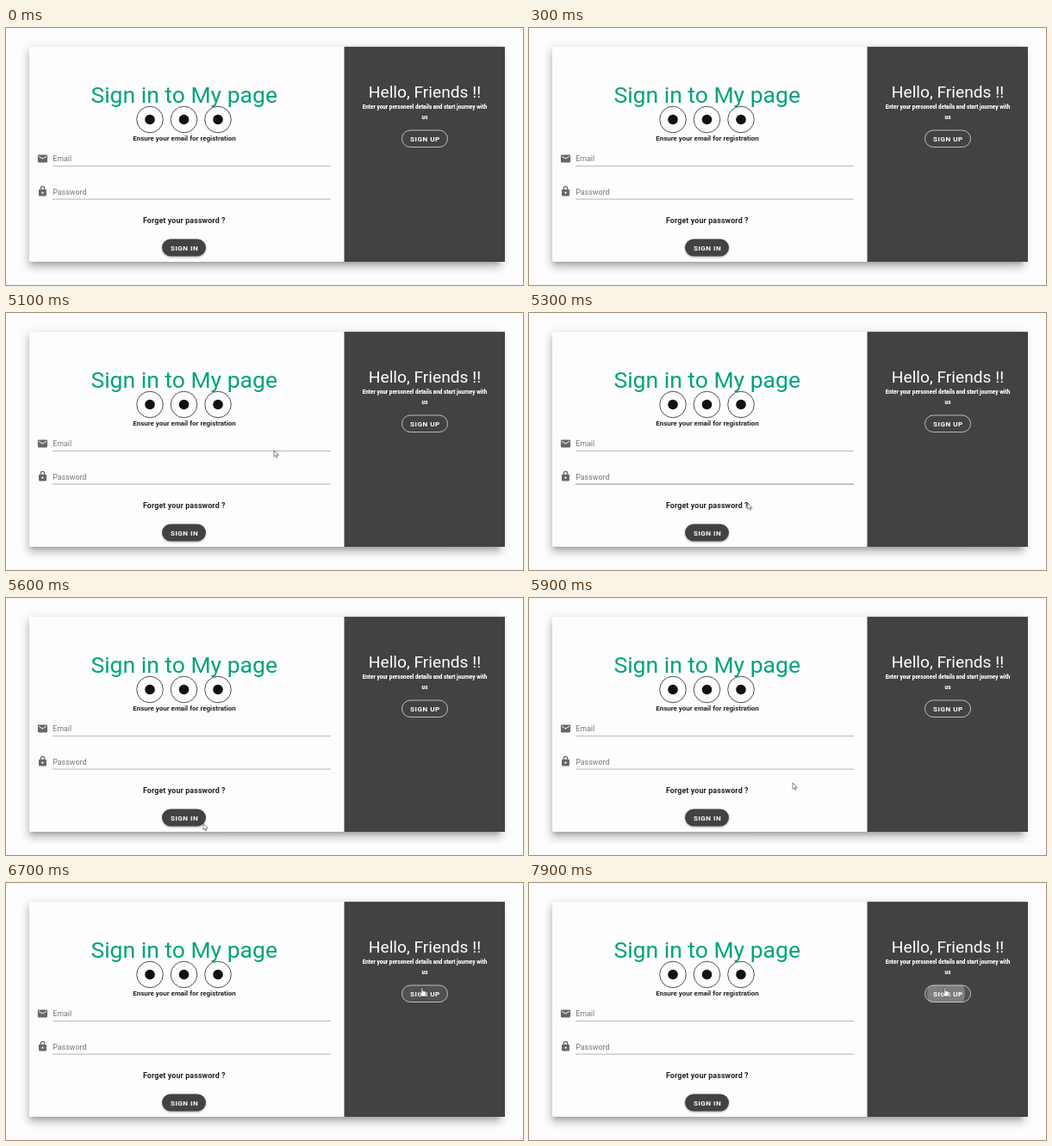
Animation, 600 px wide and 299 px high, one loop 8000 ms. Source, as an HTML page:

```html
<!DOCTYPE html>
<html lang="en">
<head>
<meta charset="utf-8">
<title>Sign in</title>
<style>
html, body { margin: 0; width: 100%; height: 100%; overflow: hidden; background: #fdfcfe; }
svg { position: absolute; inset: 0; display: block; width: 100%; height: 100%; }
text { font-family: Roboto, sans-serif; }
.mid { text-anchor: middle; }
.field { font-size: 8.9px; fill: #777; }
.btn { font-size: 8.1px; font-weight: 700; letter-spacing: .5px; fill: #fff; }
.note { font-size: 6.35px; font-weight: 900; }
.shadow { filter: drop-shadow(0 1px 1px rgba(0,0,0,.35)); }
#card { position: absolute; left: 4.58%; top: 7.36%; width: 91.1%; height: 83.6%;
  border-radius: 2px; background: #fefdfe;
  box-shadow: 0 4px 4.5px -2px rgba(0,0,0,.2), 0 6.7px 9.5px 1px rgba(0,0,0,.14), 0 2.8px 12px 2px rgba(0,0,0,.12); }
</style>
</head>
<body>
<div id="card"></div>
<svg viewBox="0 0 600 299">
  <defs>
    <clipPath id="pill"><rect x="459.5" y="119" width="53" height="19.5" rx="9.75"/></clipPath>
  </defs>
  <rect x="392.5" y="21.8" width="186.5" height="250.2" fill="#424143"/>

  <text class="mid" x="206.7" y="87" font-size="26.5" fill="#00a37b">Sign in to My page</text>
  <g id="social"></g>
  <text class="mid" x="207" y="131" font-size="7.95" font-weight="600" fill="#222">Ensure your email for registration</text>

  <g fill="#666">
    <path transform="translate(35.8 145.3) scale(.556)" d="M20 8L12 13L4 8V6L12 11L20 6M20 4H4C2.9 4 2 4.9 2 6V18A2 2 0 0 0 4 20H20A2 2 0 0 0 22 18V6C22 4.9 21.1 4 20 4Z"/>
    <path transform="translate(35.8 183.3) scale(.556)" d="M12 17A2 2 0 0 0 14 15C14 13.9 13.1 13 12 13A2 2 0 0 0 10 15A2 2 0 0 0 12 17M18 8A2 2 0 0 1 20 10V20A2 2 0 0 1 18 22H6A2 2 0 0 1 4 20V10C4 8.9 4.9 8 6 8H7V6A5 5 0 0 1 17 6V8H18M12 3A3 3 0 0 0 9 6V8H15V6A3 3 0 0 0 12 3Z"/>
  </g>
  <text class="field" x="54.2" y="155">Email</text>
  <text class="field" x="54.2" y="193.5">Password</text>
  <g stroke="#000" stroke-opacity=".4" stroke-width=".75">
    <path d="M54 160.7H377"/>
    <path id="line" d="M54 199.1H377"/>
  </g>

  <text class="mid" x="206.8" y="227" font-size="8.9" font-weight="700" letter-spacing=".12" fill="#222">Forget your password ?</text>
  <rect class="shadow" x="181" y="245.5" width="51" height="20" rx="10" fill="#424143"/>
  <text class="btn mid" x="207.1" y="258.5">SIGN IN</text>

  <g fill="#fff">
    <text class="mid" x="486" y="81" font-size="19.2">Hello, Friends !!</text>
    <text class="mid note" x="486" y="94">Enter your personeel details and start journey with</text>
    <text class="mid note" x="486" y="106">us</text>
  </g>
  <g clip-path="url(#pill)" fill="#fff">
    <rect id="tint" x="459" y="118" width="54" height="21"/>
    <circle id="ripple" cx="484" cy="128.5" r="22" opacity=".26"/>
  </g>
  <rect x="459.5" y="119" width="53" height="19.5" rx="9.75" fill="none" stroke="#fff" stroke-width=".65"/>
  <text class="btn mid" x="486.4" y="131.5">SIGN UP</text>

  <path id="arrow" d="M0 0V7.2L1.7 5.8L2.8 8.3L4 7.8L2.9 5.4H5.2Z" fill="#fff" stroke="#222" stroke-width=".55"/>
  <path id="hand" transform="translate(479 121.5)" d="M3 .7Q4 0 4.6 .9V4L7.8 4.7Q9 5 8.8 6.3L8 10.5H3.4L.6 6.8Q.6 5.6 1.8 6L3 7Z" fill="#fff" stroke="#333" stroke-width=".6"/>
</svg>
<script>
const LOOP = 8000, STEP = 100, FADE = 300;
const $ = id => document.getElementById(id);
const linear = u => u;
const easeOut = u => 1 - (1 - u) ** 2;

// pointer stops, and the bend of the long sweep
const enter = [571, 50], rest = [520, 78.5], bend = [308, 106];
const signIn = [229, 262.5], edge = [460, 120], signUp = [480, 122];
const middle = (a, b) => a.map((v, k) => (v + b[k]) / 2);

const moves = [
  { from: 4300, to: 4500, a: enter, b: rest, ease: easeOut },
  { from: 4800, to: 5600, a: rest, via: bend, b: signIn, ease: easeOut },
  { from: 5700, to: 6300, a: signIn, b: edge, ease: linear },
  { from: 6300, to: 6600, a: edge, b: signUp, ease: easeOut }
];

function pointer(t) {
  const m = moves.findLast(m => t >= m.from) || moves[0];
  const u = Math.min(1, Math.max(0, (t - m.from) / (m.to - m.from)));
  const p = m.ease(u), q = 1 - p, c = m.via || middle(m.a, m.b);
  return m.a.map((v, k) => q * q * v + 2 * q * p * c[k] + p * p * m.b[k]);
}

// share of the last FADE ms that the pointer spent inside a box
function hover(t, left, top, right, bottom) {
  const n = 6;
  let hits = 0;
  for (let i = 0; i < n; i++) {
    const [x, y] = pointer(t - i * FADE / n);
    if (x > left && x < right && y > top && y < bottom) hits++;
  }
  return hits / n;
}

const show = (id, on) => $(id).setAttribute('visibility', on ? 'visible' : 'hidden');

$('social').innerHTML = [167, 206.5, 246].map(x =>
  `<circle cx="${x}" cy="106.5" r="15.3" fill="none" stroke="#222" stroke-width=".8"/>
   <circle cx="${x}" cy="106.5" r="5.8" fill="#111"/>`).join('');

function draw(ms) {
  const t = Math.floor(ms % LOOP / STEP) * STEP;
  $('arrow').setAttribute('transform', `translate(${pointer(t)})`);
  show('arrow', t >= 4300 && t < 6700);
  show('hand', t >= 6700);
  show('ripple', t >= 7900);
  $('line').setAttribute('stroke-opacity', .4 + .47 * hover(t, 36, 165, 377, 208));
  $('tint').setAttribute('opacity', .08 * hover(t, 460, 119, 513, 139));
}

const start = performance.now();
function tick() {
  draw(performance.now() - start);
  requestAnimationFrame(tick);
}
tick();
</script>
</body>
</html>
```
